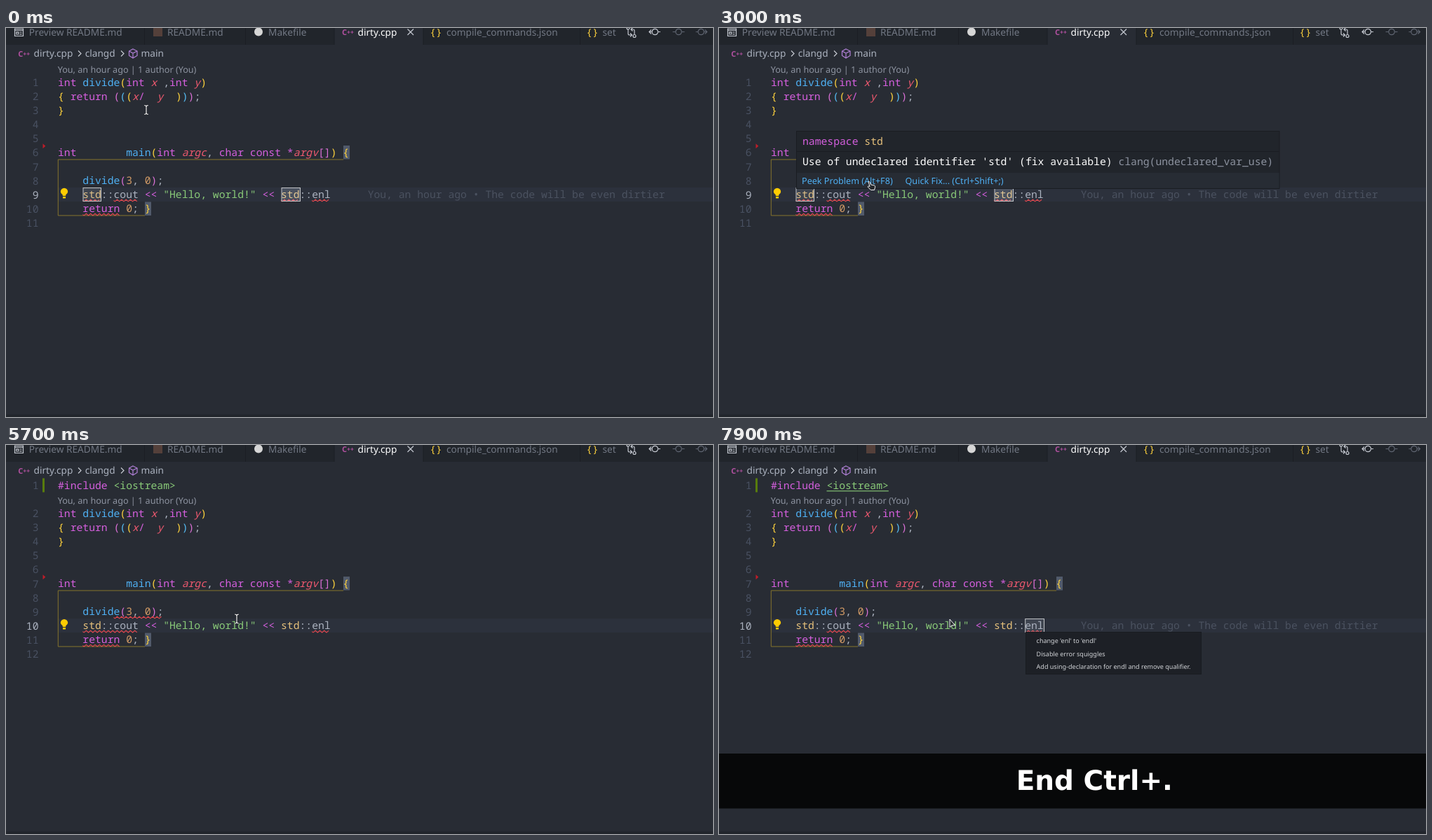
An HTML page for the animation above (8000 ms loop, 1008 by 556 pixels).

```html
<!DOCTYPE html>
<html lang="en">
<head>
<meta charset="utf-8">
<title>Quick fixes in the editor</title>
<style>
html, body { margin: 0; width: 100%; height: 100%; overflow: hidden; background: #282c34; }
svg { display: block; width: 1008px; height: 556px; }
text { white-space: pre; text-rendering: geometricPrecision; font: 13.67px "Noto Sans", sans-serif; fill: #abb2bf; }
.code { font: 14.72px "Noto Sans Mono", monospace; }
.small { font-size: 12.62px; }
.cpp { font-size: 11px; font-weight: bold; fill: #b0509f; }
.menu text { font-size: 9.03px; fill: #d2d4d8; }
.menu rect { fill: #1d2026; stroke: #191c21; }
.dim { fill: #727884; }
.num { text-anchor: end; fill: #495162; }
.num.on { fill: #abb2bf; }
.p { fill: #d55fde; } .b { fill: #4fb0f3; } .r { fill: #ef596f; font-style: italic; }
.y { fill: #ffd33d; } .m { fill: #da70d6; } .c { fill: #56bdf5; } .o { fill: #d19a66; }
.t { fill: #e5c07b; } .s { fill: #89ca78; } .w { fill: #fff; } .h { fill: #4b5260; } .d { fill: #8d93a0; }
.line { fill: none; stroke: #c5c9d1; stroke-width: 1.2; }
.faint { stroke: #5f6571; }
.wave { fill: none; stroke: #e5484f; stroke-width: 1.1; }
.box { fill: #abb2bf26; stroke: #c4c6ca; }
.solid { fill: #25282d; stroke: #f4f4f4; stroke-linejoin: round; }
#keys text { font: bold 39px "DejaVu Sans", sans-serif; fill: #fff; text-anchor: middle; }
</style>
</head>
<body>
<svg viewBox="0 0 1008 556">
  <defs><path id="ibeam" d="M-2.7 -6.3Q0 -6.3 0 -4.5Q0 -6.3 2.7 -6.3M0 -4.5V4.5M-2.7 6.3Q0 6.3 0 4.5Q0 6.3 2.7 6.3"/></defs>
  <rect width="1008" height="556" fill="#282c34"/>
  <rect width="1008" height="24" fill="#21252b"/>
  <rect x="468" width="127" height="24" fill="#282c34"/>
  <path d="M197.5 0V24M341.5 0V24M468 0V24M595 0V24M818.5 0V24" stroke="#1b1e24"/>
  <rect y="552.5" width="1008" height="4" fill="#21252b"/>

  <g id="tabs">
    <path class="line" d="M12.5 1H24.5V11.5H12.5ZM12.5 3.2H24.5M14.8 5.8H17.8V9H14.8ZM19.5 6H22.5M19.5 8.8H22.5"/>
    <rect x="210" y="0" width="13" height="12" fill="#54403a"/>
    <circle cx="360" cy="5.5" r="6" fill="#d6d6d6"/>
    <path class="line" d="M572.5 1.5L581 10M581 1.5L572.5 10"/>
    <path class="line" d="M887 2V8Q887 10 889 10H892M890 7.5L892.5 10L890 12.5M896 9V4Q896 2 894 2H891M893.5 -.5L891 2L893.5 4.5"/>
    <circle class="line" cx="887" cy="0" r="2"/><circle class="line" cx="896" cy="11.5" r="2"/>
    <path class="line" d="M917 5.5H921M929.5 5.5H933M920 2.5L917 5.5L920 8.5"/>
    <circle class="line" cx="925.3" cy="5.5" r="4.2"/>
    <g class="line faint"><circle cx="959" cy="5.5" r="4.2"/><path d="M950.5 5.5H954.8M963.2 5.5H967.5"/>
      <circle cx="991" cy="5.5" r="4.2"/><path d="M983.5 5.5H986.8M995.2 5.5H999.5M996.5 2.5L999.5 5.5L996.5 8.5"/></g>
  </g>
  <path class="line" d="M103 32.5L107 36.5L103 40.5M164 32.5L168 36.5L164 40.5"/>
  <path d="M181 30L187 33V39.5L181 43L175.5 39.5V33ZM175.5 33L181 36L187 33M181 36V43" fill="none" stroke="#b180d7" stroke-width="1.2"/>

  <g id="numbers"></g>
  <rect id="added" x="52" y="47.5" width="3" height="20" fill="#587c0c"/>
  <g id="include"></g>

  <g id="doc">
    <rect x="74" y="228" width="934" height="20" fill="#2c313c"/>
    <path d="M52.5 165.3L56.3 168.8L52.5 172.3Z" fill="#c01c28"/>
    <path d="M481 188H74.3V268H198" fill="none" stroke="#85752c"/>
    <rect x="481" y="168" width="9" height="19.5" fill="#515a6b"/>
    <rect x="198" y="248.5" width="9" height="19.5" fill="#515a6b"/>
    <g id="lines"></g>
    <g id="waves0" class="wave"></g><g id="waves1" class="wave"></g><g id="waves2" class="wave"></g>
    <g id="stdBoxes" class="box">
      <rect x="110" y="228.5" width="25.5" height="19"/>
      <rect x="393" y="228.5" width="26.5" height="19" fill="#d2e0ff2f"/>
    </g>
    <rect id="enlBox" class="box" x="436.7" y="228.5" width="26.8" height="19"/>
    <rect id="caret" x="463.6" y="228" width="2" height="20" fill="#528bff"/>
    <path d="M80.8 240V238.5Q77.8 236.5 77.8 234A5.2 5.2 0 0 1 88.2 234Q88.2 236.5 85.2 238.5V240ZM81 241H85V243.5H81Z" fill="#ffcc00"/>
  </g>

  <g id="hover">
    <rect x="110.5" y="147.5" width="688.5" height="82" fill="#21252b" stroke="#1a1d22"/>
    <rect x="111" y="207" width="687.5" height="22" fill="#272c34"/>
    <path d="M111 176.5H798.5" stroke="#1a1d22"/>
  </g>
  <g id="include-menu" class="menu">
    <rect x="273.5" y="236.5" width="216" height="22.5"/>
    <text x="287.7" y="251.2">Add include &lt;iostream&gt; for symbol std::cout</text>
  </g>
  <g id="fix-menu" class="menu">
    <rect x="437.5" y="267.5" width="250" height="60"/>
    <text x="452.6" y="283.3">change 'enl' to 'endl'</text>
    <text x="452.6" y="301.5">Disable error squiggles</text>
    <text x="452.6" y="319.7">Add using-declaration for endl and remove qualifier.</text>
  </g>
  <g id="keys">
    <rect y="441" width="1008" height="78.5" fill="#070809"/>
    <text id="keyText" x="535.3" y="493"></text>
    <rect id="keyLine" y="494" height="2" fill="#fff"/>
  </g>

  <g id="pointer">
    <g id="beam" fill="none">
      <use href="#ibeam" stroke="#1c1f24" stroke-width="2.4"/>
      <use href="#ibeam" stroke="#f4f4f4" stroke-width="1.2"/>
    </g>
    <path id="arrow" class="solid" d="M.5 .5V12L3.5 9.3H8Z"/>
    <path id="hand" class="solid" d="M2 .7Q3.5 0 4.2 1.5L5.6 5L10.5 6Q12 6.5 11.6 8.5L10.5 12.5H5.5L1.2 8.4Q1 7 2.6 7L4 7.6Z"/>
  </g>
</svg>
<script>
const $ = id => document.getElementById(id);
const COL = 8.832, ROW = 20.07, LEFT = 74;
const rowY = n => 82.6 + (n - 1) * ROW;
const add = (id, markup) => $(id).insertAdjacentHTML('beforeend', markup);
const text = (x, y, s, cls = '') => `<text x="${x}" y="${y}" class="${cls}">${s}</text>`;

// Segments are split by "~"; the first character of each is its colour class.
const code = (x, y, s) => text(x, y, s.split('~').map(p => `<tspan class="${p[0]}">${p.slice(1)}</tspan>`).join(''), 'code');

const cpp = (x, y) => text(x, y, 'C<tspan font-size="8.6" dy="-.8">++</tspan>', 'cpp');
add('tabs', [[32.8, 'Preview README.md'], [230, 'README.md'], [374, 'Makefile'], [628, 'compile_commands.json'], [850.5, 'set']]
  .map(([x, s]) => text(x, 11, s, 'dim')).join('')
  + text(501.5, 11, 'dirty.cpp', 'w') + text(39.5, 41, 'dirty.cpp') + text(112.7, 41, 'clangd') + text(192.5, 41, 'main')
  + cpp(479, 10) + cpp(17.3, 40.5)
  + [606, 829].map(x => text(x, 10.5, '{ }', 'y')).join(''));

for (let n = 1; n <= 12; n++) add('numbers', text(46.5, rowY(n) + .5, n, 'code num'));
const numbers = [...$('numbers').children];

add('include', code(LEFT, rowY(0), 'p#include ~s&lt;iostream&gt;')
  + '<rect id="link" x="153.5" y="65.2" width="88.3" height="1.1" fill="#89ca78"/>');

const source = {
  1: 'pint ~bdivide~y(~pint ~rx~g ,~pint ~ry~y)',
  2: 'y{~p return ~m(~c(~y(~rx~p/~r  y~y  )~c)~m)~g;',
  3: 'y}',
  6: 'pint        ~bmain~y(~pint ~rargc~g, ~pchar const *~rargv~m[]~y) {',
  8: 'b    divide~m(~o3~g, ~o0~m)~g;',
  9: 't    std~g::cout ~p&lt;&lt; ~s"Hello, world!"~p &lt;&lt; ~tstd~g::enl~h      You, an hour ago • The code will be even dirtier',
  10: 'p    return ~o0~g; ~y}'
};
for (const n in source) add('lines', code(LEFT, rowY(n), source[n]));
add('lines', text(LEFT - .3, 63.5, 'You, an hour ago | 1 author (You)', 'small d'));
const blame = $('lines').querySelector('.h');

// Wavy underline below columns a..b of row n.
const wave = ([n, a, b]) => {
  const start = LEFT + a * COL, y = rowY(n) + 3.4;
  let d = `M${start} ${y}`, side = 1.3;
  for (let x = start + 1.9; x <= LEFT + b * COL + .5; x += 3.15, side = -side) d += `L${x} ${y + side}`;
  return `<path d="${d}"/>`;
};
const always = [[9, 41, 44], [10, 4, 10]];
[
  [[9, 4, 7], [9, 9, 13], [9, 36, 39]],
  [[8, 9, 17], [9, 4, 13]],
  [[9, 9, 13]]
].forEach((set, i) => add('waves' + i, [...set, ...always].map(wave).join('')));

add('hover', code(119, 167.3, 'pnamespace ~tstd')
  + code(119, 196, "wUse of undeclared identifier 'std' (fix available)~d clang(undeclared_var_use)")
  + text(118, 222.8, 'Peek Problem (Alt+F8)', 'small b') + text(265.5, 222.8, 'Quick Fix... (Ctrl+Shift+;)', 'small b'));

const moves = [
  [0, 200, 117, 'beam'], [1700, 122, 239.5, 'beam'],
  [3000, 211, 219, 'hand'], [3400, 238, 216, 'hand'], [3500, 261, 213, 'hand'],
  [3700, 274, 216, 'arrow'], [4200, 274, 210, 'arrow'], [4400, 296, 232, 'arrow'], [4500, 324, 268, 'arrow'],
  [4600, 326, 261, 'arrow'], [4800, 326.5, 257, 'arrow'], [4900, 328, 252, 'arrow'], [5000, 328.5, 248.5, 'arrow'],
  [5200, 0, 0, ''], [5400, 329, 248.5, 'beam'], [7400, 328.5, 248.5, 'arrow']
];

const clamp = v => Math.max(0, Math.min(1, v));
const smooth = v => (v = clamp(v), v * v * (3 - 2 * v));
const fade = (id, v) => $(id).style.opacity = v;
const show = (id, on) => $(id).style.display = on ? '' : 'none';

function draw(t) {
  const shifted = t >= 5400;
  $('doc').setAttribute('transform', `translate(0 ${shifted ? ROW : 0})`);
  numbers.forEach((e, i) => e.classList.toggle('on', i === (shifted ? 9 : 8)));
  numbers[0].setAttribute('y', rowY(shifted ? 0 : 1) + .5);
  numbers[11].style.display = shifted ? '' : 'none';
  show('added', shifted);
  show('include', shifted);
  show('link', t >= 6300);

  const stage = t < 5500 ? 0 : t < 7500 ? 1 : 2;
  for (let i = 0; i < 3; i++) show('waves' + i, i === stage);
  show('stdBoxes', !shifted);
  show('enlBox', t >= 6500);
  show('caret', t >= 6300 && t < 6800);
  blame.style.opacity = t < 5400 ? 1 : clamp((t - 6700) / 200);

  fade('hover', t < 3700 ? clamp((t - 1600) / 400) : clamp((4000 - t) / 400));
  fade('include-menu', t < 4200 ? 0 : clamp((5000 - t) / 200));
  fade('fix-menu', clamp((t - 7700) / 200));

  show('keys', t >= 6300);
  $('keyText').textContent = t < 7400 ? 'End' : 'End Ctrl+.';
  const first = t < 6500, second = t >= 7400 && t < 7800;
  show('keyLine', first || second);
  $('keyLine').setAttribute('x', first ? 494.5 : 519.5);
  $('keyLine').setAttribute('width', first ? 81.5 : 125.5);

  let [start, x, y, kind] = moves.findLast(m => m[0] <= t);
  if (!start) {
    const k = (t - 700) / 900;
    x -= 81.5 * smooth(k * 9 / 7);
    y += 120 * smooth(k);
  }
  $('pointer').setAttribute('transform', `translate(${x} ${y})`);
  for (const k of ['beam', 'arrow', 'hand']) show(k, k === kind);
}

const begin = performance.now();
function tick() {
  const t = (performance.now() - begin) % 8000;
  draw(Math.floor(t / 100) * 100);
  requestAnimationFrame(tick);
}
tick();
</script>
</body>
</html>
```
